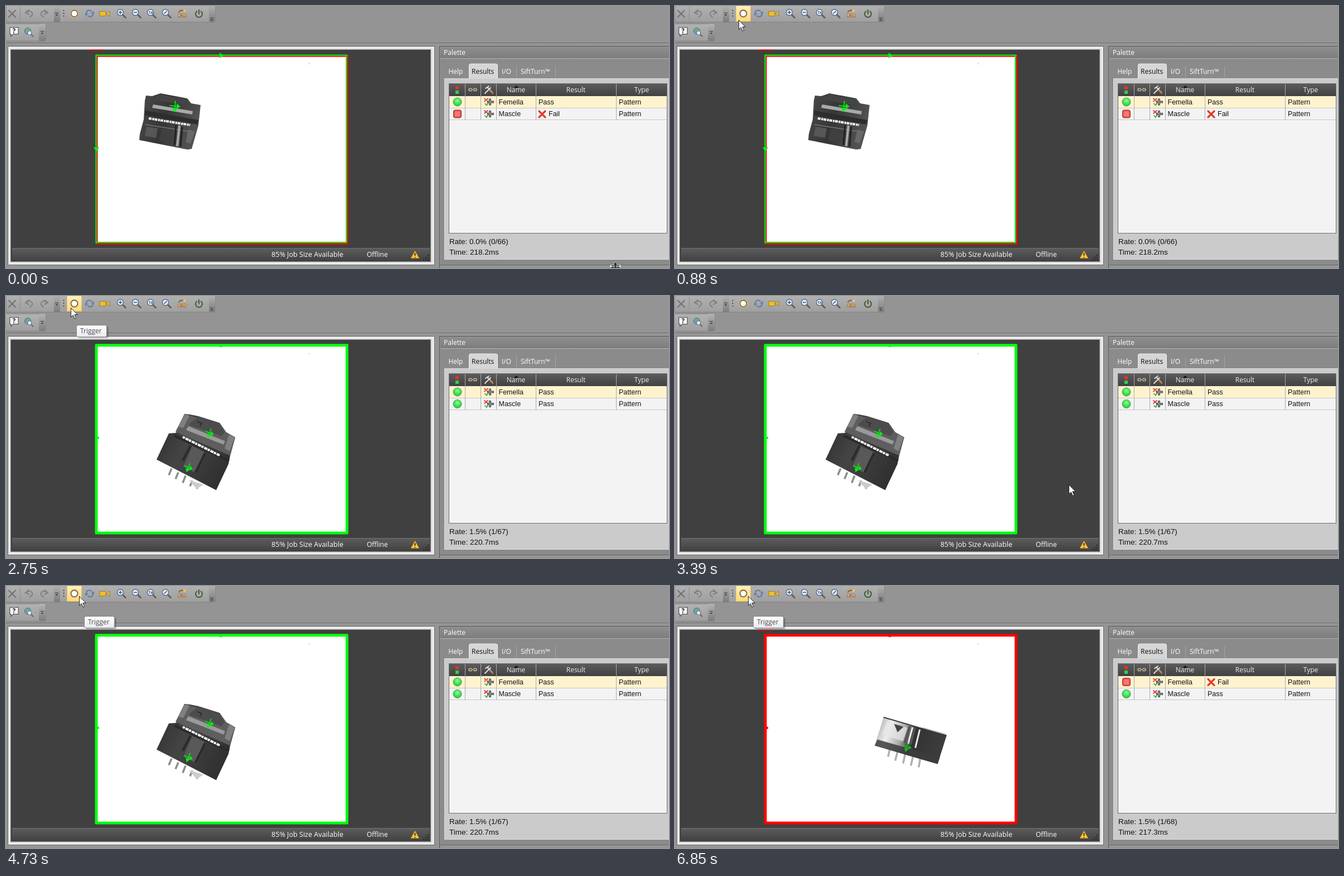
Write an HTML page that moves like this. It is 1189x471 px and loops after 8000 ms.

```html
<!DOCTYPE html>
<html lang="en">
<head>
<meta charset="utf-8">
<title>Inspection console</title>
<style>
html, body { margin: 0; width: 100%; height: 100%; overflow: hidden; background: #949494; }
svg { display: block; width: 100vw; height: 100vh; }
text { font: 12px "Open Sans", "Noto Sans", sans-serif; white-space: pre; }
.cell { font: 12.5px "Liberation Sans", Arial, sans-serif; fill: #111; }
.stat { font: 13.5px "Liberation Sans", Arial, sans-serif; fill: #111; }
.head { fill: #eee; text-anchor: middle; }
.light { fill: #fff; }
.line { fill: none; stroke-linecap: round; }
</style>
</head>
<body>
<svg viewBox="0 0 1189 471" preserveAspectRatio="none">
<defs>
  <linearGradient id="bar" x2="0" y2="1"><stop stop-color="#b2b2b2"/><stop offset="1" stop-color="#9f9f9f"/></linearGradient>
  <linearGradient id="cap" x2="0" y2="1"><stop stop-color="#b4b4b4"/><stop offset="1" stop-color="#7c7c7c"/></linearGradient>
  <linearGradient id="dark" x2="0" y2="1"><stop stop-color="#5c5c5c"/><stop offset="1" stop-color="#414141"/></linearGradient>
  <linearGradient id="title" x2="0" y2="1"><stop stop-color="#8e8e8e"/><stop offset="1" stop-color="#7d7d7d"/></linearGradient>
  <linearGradient id="warm" x2="0" y2="1"><stop stop-color="#fff0c0"/><stop offset="1" stop-color="#ffd978"/></linearGradient>
  <linearGradient id="tipFill" x2="0" y2="1"><stop stop-color="#fff"/><stop offset="1" stop-color="#e9e9f0"/></linearGradient>
  <radialGradient id="ball" cy=".35"><stop stop-color="#8dff8d"/><stop offset="1" stop-color="#2fd545"/></radialGradient>
  <linearGradient id="body" x2="1" y2=".3"><stop stop-color="#4b4b4b"/><stop offset=".5" stop-color="#363636"/><stop offset="1" stop-color="#525252"/></linearGradient>
  <linearGradient id="face" x2="1" y2=".5"><stop stop-color="#2b2b2b"/><stop offset=".45" stop-color="#444"/><stop offset="1" stop-color="#303030"/></linearGradient>
  <linearGradient id="shine" x2="1" y2=".25"><stop stop-color="#999"/><stop offset=".25" stop-color="#eee"/><stop offset=".45" stop-color="#aaa"/><stop offset=".6" stop-color="#333"/><stop offset="1" stop-color="#3c3c3c"/></linearGradient>
  <g id="pass"><circle r="7.500" fill="url(#ball)" stroke="#4a9a55"/></g>
  <g id="fail"><rect x="-7" y="-7" width="14" height="14" rx="3" fill="#e9504d" stroke="#8e2f2c"/><rect x="-4.500" y="-4.500" width="9" height="9" rx="1" fill="#f47a74"/></g>
  <g id="tool" class="line">
    <path d="M-8-6l6 5m0-5l-6 5" stroke="#d33" stroke-width="1.700"/>
    <path d="M-7 3l3 3 3-6" stroke="#3a3" stroke-width="1.700"/>
    <path d="M2-6V6M-3 0H9" stroke="#555" stroke-width="4" stroke-linecap="butt"/>
    <path d="M2-4V4M-1 0H7" stroke="#999" stroke-width="1.500"/>
  </g>
  <g id="cross" fill="#00ef12"><path class="line" d="M-9 0H4M0-9V4" stroke="#00ef12" stroke-width="1.800"/><path d="M3-5L10 0 3 5zM-5 3H5L0 11z"/></g>
  <g id="lens" class="line"><path d="M3.500 3.500l5 5" stroke="#6f5c45" stroke-width="2.800"/><circle cx="-1" cy="-1" r="5.500" fill="#e4eefa" stroke="#56688a" stroke-width="1.400"/></g>
  <g id="drop" stroke="#333" fill="#333"><path d="M-3 .5H3"/><path d="M-2.500 3h5L0 5.500z" stroke="none"/></g>
</defs>

<rect width="1189" height="471" fill="#949494"/>

<!-- toolbars -->
<rect y="-3" width="375" height="32" rx="3" fill="url(#bar)" stroke="#828282"/>
<rect x="86" y="-3" width="11" height="32" fill="url(#cap)"/>
<rect x="364" y="-3" width="11" height="32" rx="2" fill="url(#cap)"/>
<rect x="-4" y="32" width="75" height="31" rx="3" fill="url(#bar)" stroke="#828282"/>
<rect x="59" y="32" width="12" height="31" rx="2" fill="url(#cap)"/>
<path d="M0 66.500H1189" stroke="#666"/>
<path d="M0 67.500H1189" stroke="#a3a3a3"/>
<use href="#drop" x="91" y="12"/><use href="#drop" x="369" y="21"/><use href="#drop" x="65" y="45"/>
<g class="line" stroke="#808080" stroke-width="2">
  <path d="M5 8l12 12m0-12L5 20" stroke="#707070"/>
  <path d="M25.500 2V27" stroke="#8d8d8d" stroke-width="1"/>
  <path d="M36 12c6-6 13-1 11 4l-4 4M41 7l-6 5 6 3M74 12c-6-6-13-1-11 4l4 4M69 7l6 5-6 3"/>
  <path d="M103.500 8v.1M103.500 13v.1M103.500 18v.1" stroke="#333"/>
</g>
<rect id="hover" y="-1" width="26" height="28.500" fill="url(#warm)" stroke="#e8c364"/>
<g>
  <circle cx="122.500" cy="13.500" r="7" fill="none" stroke="#edb84a" stroke-width="1.500"/>
  <circle cx="122.500" cy="13.500" r="5.800" fill="#fff" stroke="#3c3c3c" stroke-width="1.200"/>
  <path class="line" d="M144 13c0-5 5-7 9-4M156 14c0 5-5 7-9 4" stroke="#5f7fae" stroke-width="2.200"/>
  <path d="M152 13l6-4v5zM148 14l-6 4v-5z" fill="#5f7fae"/>
  <path d="M168 9.500h11v8.500H168zM180 13.500l6-4.500v9.500z" fill="#f0bd2c" stroke="#7c6420" stroke-width=".7"/>
</g>
<use href="#lens" x="206" y="12.500"/><use href="#lens" x="233" y="12.500"/><use href="#lens" x="260" y="12.500"/><use href="#lens" x="287" y="12.500"/>
<path class="line" d="M202.500 11.500h5m-2.500-2.500v5M229.500 11.500h5M284 13.500l4-4" stroke="#334e78" stroke-width="1.500"/>
<text x="255.500" y="14" style="font-size:7px;font-weight:700" fill="#334e78">1x</text>
<path d="M309 15h14v5h-14z" fill="#f3e2bb" stroke="#6b5330" stroke-width=".8"/>
<path d="M309 19l5-4 4 2 2-1 3 3z" fill="#c9712f"/>
<path class="line" d="M310 11c3-4 6-4 9-2" stroke="#9c5724" stroke-width="1.800"/><circle cx="320" cy="8.500" r="2.300" fill="#ffc94b"/>
<path class="line" d="M342.500 9.500a6 6 0 1 0 7 0M346 7v7" stroke="#3d5c31" stroke-width="2"/>
<path d="M7 38.500h15v12H13l-4 4v-4H7z" fill="#fff" stroke="#444" stroke-width="1.100"/>
<text x="11.500" y="49" style="font-weight:700" fill="#223">?</text>
<circle cx="39" cy="45" r="5.500" fill="#6ba0c4" stroke="#3f6b8c"/><path d="M35 42l4-2 2 4-4 3z" fill="#80ad57"/>
<use href="#lens" transform="translate(43 49) scale(.65)"/>

<!-- camera view -->
<rect x="3.500" y="72.500" width="765" height="393" fill="#dedede" stroke="#717171"/>
<rect x="6" y="75" width="760" height="388" fill="none" stroke="#f0f0f0" stroke-width="2"/>
<rect x="8.500" y="78.500" width="753" height="381" fill="#404040" stroke="#777"/>
<rect x="11" y="436" width="749" height="22" fill="url(#dark)"/>
<path d="M11 435.500H760" stroke="#707070"/>
<text class="light" x="476" y="451" style="font-size:12.600px">85% Job Size Available</text>
<text class="light" x="647" y="451">Offline</text>
<path d="M733.500 440l7.500 13.500h-15z" fill="#ffc73a" stroke="#b47d12"/><path d="M733.500 444v5m0 2v1.500" stroke="#222" stroke-width="1.800"/>
<path d="M757 447v10M753 451v6M749 455v2" stroke="#222" stroke-width="2" stroke-dasharray="2"/>
<path id="mark" d="M149 79.500H176" stroke="#e00" stroke-width="2" stroke-dasharray="5 1 3 1"/>
<rect x="161" y="88" width="452" height="339" fill="#fff"/>
<rect x="543" y="103" width="1.500" height="1.500" fill="#aaa"/>

<g id="sceneA">
  <path d="M249 170l2-9 11 1 15-5 48 9 7 9 17 3-4 37-12 42-8 1-86-17 1-11 7-26z" fill="url(#body)"/>
  <path d="M267 165l10-6 47 9 6 11-64-10z" fill="#444"/>
  <path d="M264 177l71 12-1 6-72-12z" fill="#a9a9a9"/>
  <path d="M250 188l95 17-2 8-94-17z" fill="#2d2d2d"/>
  <path d="M256 202l74 12" stroke="#fff" stroke-width="4" stroke-dasharray="5 1.500 3 1"/>
  <path d="M250 213l88 14" stroke="#777" stroke-width="1.500"/>
  <path d="M252 217l20 3-3 17-20-3z" fill="#575757"/><path d="M279 220l19 3-4 22-19-4z" fill="#404040"/>
  <path d="M305 214l-3 36M316 217l-3 36" stroke="#222" stroke-width="3"/><path d="M311 215l-4 37" stroke="#aaa" stroke-width="4"/>
  <path d="M327 222l12 3-8 22-9-2z" fill="#686868"/>
  <use href="#cross" transform="translate(303 180) rotate(5)"/>
  <rect x="163" y="90" width="449.500" height="337.500" fill="none" stroke="#f00" stroke-width="3"/>
  <rect x="161.500" y="88.500" width="449" height="336.500" fill="none" stroke="#00ef12" stroke-width="2.300"/>
  <path d="M383 84l8 5-8 5zM157 254h10l-5 8z" fill="#00ef12"/>
</g>

<g id="sceneB">
  <path d="M297 310l-5 12m17-5l-5 12m18-6l-5 13m17-4l-4 10m15-5l-3 10" stroke="#8d8d8d" stroke-width="3.500"/>
  <path d="M328 331l26 8-12 8z" fill="#ccc"/>
  <path d="M305 246l15-34 10 1 15 3 38 12 12 17 16 9-9 33-3 15-22 47-107-55 22-47z" fill="url(#face)"/>
  <path d="M304 244l16-32 10 3 55 16 10 14 16 9-9 33z" fill="#5e5e5e"/>
  <path d="M331 228l14-11 38 12 9 16-6 7-58-20z" fill="#4c4c4c"/>
  <path d="M320 213l9 2-11 22-9-2zM400 249l10 5-9 25-9-5z" fill="#808080"/>
  <path d="M327 234l66 27-3 6-67-26z" fill="#9a9a9a"/>
  <path d="M343 226l8 3-3 5" class="line" stroke="#2a2a2a" stroke-width="1.500"/>
  <path d="M302 251l98 45" stroke="#2b2b2b" stroke-width="5"/>
  <path d="M317 253.500l66 33" stroke="#fff" stroke-width="4" stroke-dasharray="4 1.500 6 1"/>
  <path d="M334 270l23 11-19 36-20-10z" fill="#595959"/><path d="M331 269l-14 27M357 282l-17 35" stroke="#2b2b2b" stroke-width="4"/>
  <use href="#cross" transform="translate(365 246) rotate(22) scale(.85)"/>
  <use href="#cross" transform="translate(327 308) rotate(22) scale(.85)"/>
</g>

<g id="sceneC">
  <path d="M385 294l-3 13m17-9l-4 16m18-13l-4 18m18-14l-4 18m17-14l-3 17" stroke="#b0b0b0" stroke-width="3.500"/>
  <path d="M445 254l40 11 3 6-50-14z" fill="#ccc"/>
  <path d="M374 236l113 33-16 51-113-33z" fill="url(#shine)"/>
  <path d="M380 243l37 12-8 24-38-12z" fill="#e9e9e9" opacity=".7"/>
  <path d="M374 236l113 33" stroke="#3b3b3b" stroke-width="2"/>
  <path d="M363 276l112 32-4 12-113-33z" fill="#3d3d3d" opacity=".85"/>
  <path d="M393 248l17 5-11 10z" fill="#444"/>
  <path d="M421 252l-9 30M430 255l-8 30" stroke="#555" stroke-width="4"/>
  <path d="M426 254l-8 30M439 258l-8 33" stroke="#eee" stroke-width="3"/>
  <use href="#cross" transform="translate(416 289) rotate(16) scale(.9)" opacity=".7"/>
</g>
<g id="frame" fill="none" stroke-width="5" stroke-linejoin="round">
  <rect x="162" y="88.500" width="449.500" height="337.500"/>
  <path d="M383 90h4M163 255h4" stroke-width="4"/>
</g>

<!-- results panel -->
<path d="M777.500 471V72.500H1189" fill="none" stroke="#555"/>
<rect x="779" y="74" width="410" height="20" fill="url(#title)"/>
<rect x="779" y="94" width="410" height="371" fill="#8b8b8b"/>
<path d="M779 94.500H1189" stroke="#b5b5b5"/>
<path d="M777 465.500H1189" stroke="#686868"/>
<text class="light" x="785" y="88">Palette</text>
<rect x="786.500" y="130.500" width="410" height="325" fill="#cbcbcb" stroke="#dedede"/>
<path d="M830.500 131V107q0-3 3-3h45q3 0 3 3v24" fill="#d6d6d6" stroke="#f0f0f0"/>
<path d="M915.500 108v21M985.500 108v21" stroke="#a5a5a5"/>
<text class="light" x="793.500" y="122">Help</text><text x="835" y="122" fill="#111">Results</text>
<text class="light" x="889" y="122">I/O</text><text class="light" x="923" y="122">SiftTurn™</text>
<rect x="794.500" y="139.500" width="391" height="269" fill="#f3f3f3" stroke="#6c6c6c"/>
<rect x="795" y="140" width="390" height="22" fill="url(#dark)"/>
<rect x="795" y="162" width="390" height="21" fill="#fff3cf"/>
<path d="M795 183.500H1185M795 204.500H1185" stroke="#c6c6c6"/>
<path d="M823.500 140v65M851.500 140v65M879.500 140v65M950.500 140v65M1094.500 140v65" stroke="#aaa"/>
<circle cx="809" cy="147" r="3.300" fill="#d33"/><rect x="806" y="152" width="6" height="6" fill="#3c4"/>
<path class="line" d="M835 148.500h-3a2 2 0 0 0 0 4h3m4-4h3a2 2 0 0 1 0 4h-3m-4-2h4" stroke="#cdbb98" stroke-width="1.600"/>
<path class="line" d="M859 157l10-10m-6-1l9 9M860 148l6-4" stroke="#ddd" stroke-width="2"/><path class="line" d="M868 152l5 5" stroke="#b97a4b" stroke-width="2.500"/>
<path d="M911 147l4-4 4 4z" fill="#111"/>
<text class="head" x="914.500" y="155">Name</text><text class="head" x="1022" y="155">Result</text><text class="head" x="1140" y="155">Type</text>
<use href="#tool" x="866" y="172.500"/><use href="#tool" x="866" y="194"/>
<text class="cell" x="883.500" y="177">Femella</text><text class="cell" x="883.500" y="198">Mascle</text>
<text class="cell" x="1099" y="177">Pattern</text><text class="cell" x="1099" y="198">Pattern</text>
<g class="row" transform="translate(0 172.500)"><use x="809.500"/><path class="line" d="M956-5l11 11m0-11l-11 11" stroke="#e43b2d" stroke-width="3.200"/><text class="cell" y="4.500"/></g>
<g class="row" transform="translate(0 194)"><use x="809.500"/><path class="line" d="M956-5l11 11m0-11l-11 11" stroke="#e43b2d" stroke-width="3.200"/><text class="cell" y="4"/></g>
<text class="stat" id="rate" x="795" y="428"/><text class="stat" id="time" x="795" y="447"/>

<g id="tip">
  <rect x="3" y="3" width="55" height="21" rx="3" opacity=".2"/>
  <rect x=".5" y=".5" width="54" height="21" rx="3" fill="url(#tipFill)" stroke="#868686"/>
  <text x="7" y="15" fill="#4d4d4d">Trigger</text>
</g>
<path id="arrow" d="M0 0V16.500L3.800 13 6.700 19.500 9.200 18.400 6.400 12H11.700z" fill="#fff" stroke="#222"/>
<g id="sizer" class="line"><path d="M1086 467.500h14M1093 464v7" stroke="#fff" stroke-width="5"/><path d="M1086 466.500h14M1086 469.500h14M1093 464v7" stroke="#111" stroke-width="1.500"/><path d="M1090 465l3-4 3 4z" fill="#111"/></g>
</svg>
<script>
const LOOP = 8000;
const $ = id => document.getElementById(id);
const show = (el, on) => el.style.display = on ? "" : "none";
const rows = [...document.querySelectorAll(".row")];
const buttons = [122, 150, 177, 206, 233, 260, 287, 316, 346];

// Each trip: start, end, then evenly timed pointer positions.
const trips = [
  [70, 810, [[1080, 440], [960, 400], [800, 340], [620, 280], [440, 220], [280, 160], [140, 110], [45, 75], [18, 58], [50, 48], [90, 38], [113, 31]]],
  [880, 880, [[114, 26]]],
  [1020, 1150, [[115, 23], [116, 19], [116, 17]]],
  [2750, 3530, [[116, 22], [124, 40], [170, 90], [270, 150], [400, 210], [540, 270], [650, 320], [715, 350], [729, 352], [706, 340], [400, 400], [18, 434]]],
  [3600, 4060, [[30, 330], [110, 190], [200, 80], [262, 16], [230, 14], [190, 16], [150, 18], [131, 19]]]
];
const states = [
  { from: 0, scene: "sceneA", pass: [true, false], rate: "0.0% (0/66)", time: "218.2ms" },
  { from: 1690, scene: "sceneB", pass: [true, true], rate: "1.5% (1/67)", time: "220.7ms", frame: "#00ff0d" },
  { from: 6850, scene: "sceneC", pass: [false, true], rate: "1.5% (1/68)", time: "217.3ms", frame: "#f00" }
];
let current;

function pointer(t) {
  const trip = trips.findLast(([start]) => t >= start);
  if (!trip) return null;
  const [start, end, points] = trip, last = points.length - 1;
  const step = t >= end ? last : Math.floor((t - start) / (end - start) * last);
  return points[step];
}

function fade(t, start, end) {
  return t < start || t >= end ? 0 : Math.min(1, (Math.floor((t - start) / 70) + 1) / 4);
}

function apply(state) {
  if (state === current) return;
  current = state;
  for (const s of states) show($(s.scene), s === state);
  show($("frame"), state.frame);
  $("frame").setAttribute("stroke", state.frame || "none");
  show($("mark"), state.pass.includes(false));
  rows.forEach((row, i) => {
    const ok = state.pass[i], label = row.querySelector("text");
    row.querySelector("use").setAttribute("href", ok ? "#pass" : "#fail");
    show(row.querySelector("path"), !ok);
    label.textContent = ok ? "Pass" : "Fail";
    label.setAttribute("x", ok ? 955 : 973);
  });
  $("rate").textContent = "Rate: " + state.rate;
  $("time").textContent = "Time: " + state.time;
}

function draw(t) {
  apply(states.findLast(s => t >= s.from));
  const p = pointer(t);
  show($("sizer"), !p);
  show($("arrow"), p);
  if (p) $("arrow").setAttribute("transform", `translate(${p[0] + .5} ${p[1] - .5})`);

  const button = p && p[1] < 29 && buttons.find(x => Math.abs(x - p[0]) <= 13.5);
  show($("hover"), button);
  if (button) $("hover").setAttribute("x", button - 12.5);
  const pressed = t >= 1560 && t < 1630 || t >= 6450 && t < 6520;
  $("hover").setAttribute("fill", pressed ? "#f6b95c" : "url(#warm)");

  const second = t >= 4520;
  $("tip").setAttribute("opacity", second ? fade(t, 4520, LOOP) : fade(t, 1350, 2820));
  $("tip").setAttribute("transform", second ? "translate(140 54)" : "translate(126 52)");
}

const begin = performance.now();
function tick() {
  draw((performance.now() - begin) % LOOP);
  requestAnimationFrame(tick);
}
tick();
</script>
</body>
</html>
```
